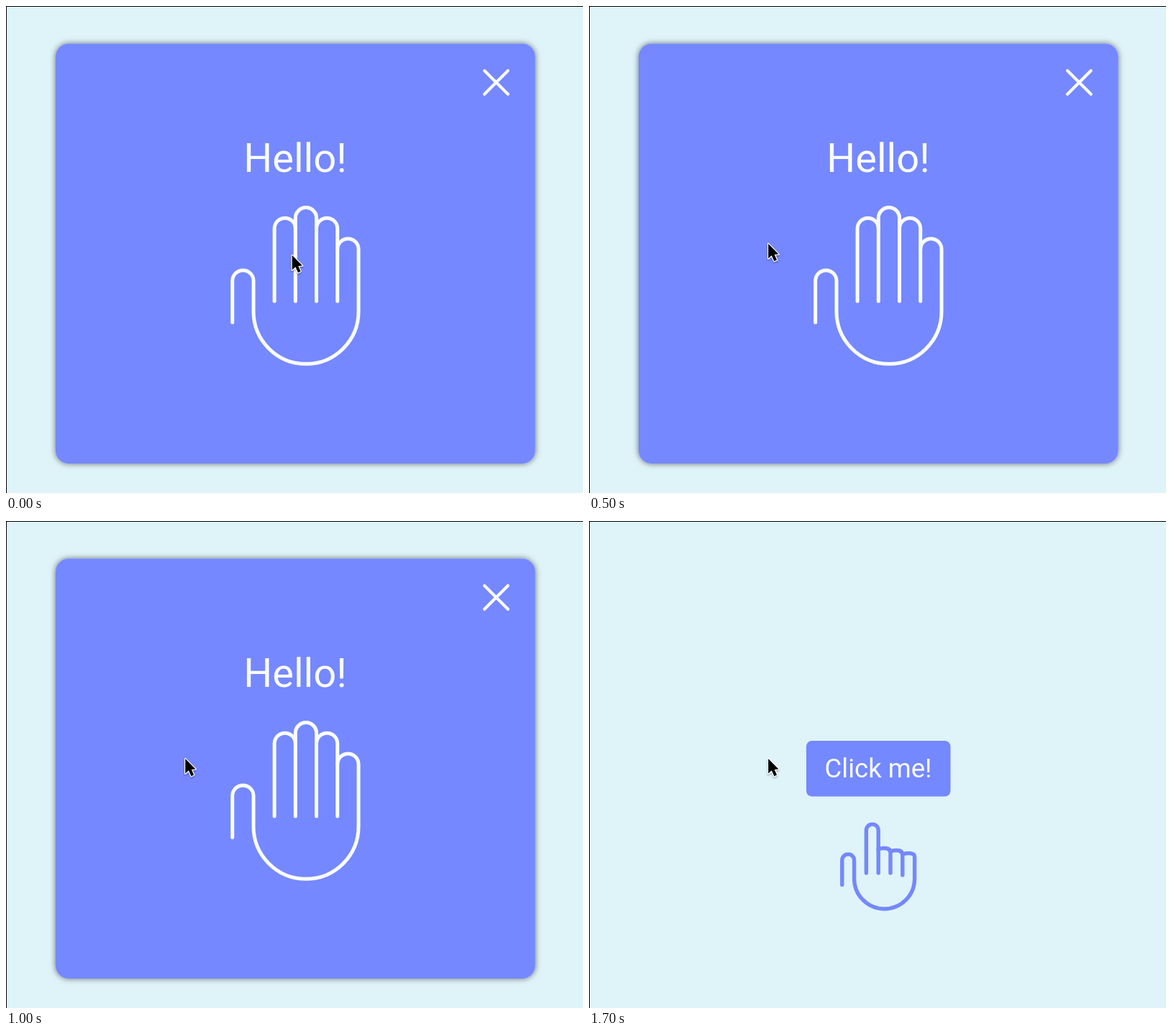
An HTML page for the animation above (2000 ms loop, 802 by 678 pixels).

```html
<!DOCTYPE html>
<html lang="en">
<head>
<meta charset="utf-8">
<title>Modal demo</title>
<style>
  html, body { margin: 0; width: 100%; height: 100%; overflow: hidden; background: #dff4f9; }
  svg { display: block; width: 802px; height: 678px; }
  text { font-family: Roboto, sans-serif; fill: #fafdff; text-anchor: middle; }
  .line { fill: none; stroke-linecap: round; stroke-linejoin: round; }
  .light { stroke: #fafdff; }
  .blue { stroke: #7488ff; }
</style>
</head>
<body>
<svg viewBox="0 0 802 678">
  <defs>
    <filter id="cardShadow" x="-5%" y="-5%" width="110%" height="110%">
      <feDropShadow dx="0" dy="0" stdDeviation="4" flood-color="#000" flood-opacity=".55"/>
    </filter>
    <filter id="cursorShadow" x="-50%" y="-50%" width="200%" height="200%">
      <feDropShadow dx="0" dy="1.5" stdDeviation="1.2" flood-color="#000" flood-opacity=".35"/>
    </filter>
  </defs>

  <rect width="802" height="678" fill="#dff4f9"/>
  <path d="M0 0H802V1H1V678H0Z" fill="#000"/>

  <g id="page">
    <rect x="302" y="306" width="200.5" height="77.5" rx="8" fill="#7488ff"/>
    <text x="402" y="357" font-size="36.5">Click me!</text>
    <g class="line blue" stroke-width="5.4">
      <path d="M351.8 506.5V472.3a8.4 8.4 0 0 1 16.8 0V498a42 42 0 0 0 84 0V467.5q0-5-8.4-5-4.5 0-8.4 1.5"/>
      <path d="M385.4 490V430.5a8.4 8.4 0 0 1 16.8 0V490"/>
      <path d="M402.2 457q3.5-1.5 8-1.5 8.8 0 8.8 6.5V490"/>
      <path d="M419 460q3.5-1.5 8-1.5 8.8 0 8.8 6.5V493"/>
    </g>
  </g>

  <g id="modal">
    <rect x="69" y="52.5" width="666.5" height="584.5" rx="18" fill="#7488ff" filter="url(#cardShadow)"/>
    <path class="line light" stroke-width="4.2" d="M665 90L697.7 122.7M697.7 90L665 122.7"/>
    <text x="402" y="231.3" font-size="56">Hello!</text>
    <g class="line light" stroke-width="5">
      <path d="M314.7 440.5V382.6a14.65 14.65 0 0 1 29.3 0V425.3a73 73 0 0 0 146 0V338.6a14.65 14.65 0 0 0-29.3 0"/>
      <path d="M373.1 411V309.8a14.6 14.6 0 0 1 29.2 0"/>
      <path d="M402.3 411V295.2a14.6 14.6 0 0 1 29.2 0V411"/>
      <path d="M431.5 309.8a14.6 14.6 0 0 1 29.2 0V411"/>
    </g>
  </g>

  <g id="cursor">
    <path d="M0 0V20.5L4.6 16.3 8.3 24.2 11.9 22.5 8.5 15 14.3 14.6Z"
      fill="#000" stroke="#fff" stroke-width="2.4" stroke-linejoin="round"
      paint-order="stroke" filter="url(#cursorShadow)"/>
  </g>
</svg>
<script>
  const LOOP = 2000, STEP = 100, CLOSE = 1100, GLIDE = 445;
  const [page, modal, cursor] = ['page', 'modal', 'cursor'].map(id => document.getElementById(id));
  const from = [397.7, 347], to = [249.2, 331];

  const ease = u => u * u * (3 - 2 * u);
  const show = (el, on) => el.setAttribute('visibility', on ? 'visible' : 'hidden');

  function draw(ms) {
    const t = Math.floor((ms % LOOP) / STEP) * STEP;
    const k = ease(Math.min(1, t / GLIDE));
    const [x, y] = from.map((a, i) => a + (to[i] - a) * k);
    cursor.setAttribute('transform', `translate(${x} ${y})`);
    show(modal, t < CLOSE);
    show(page, t >= CLOSE);
  }

  const start = performance.now();
  function tick() {
    draw(performance.now() - start);
    requestAnimationFrame(tick);
  }
  tick();
</script>
</body>
</html>
```
